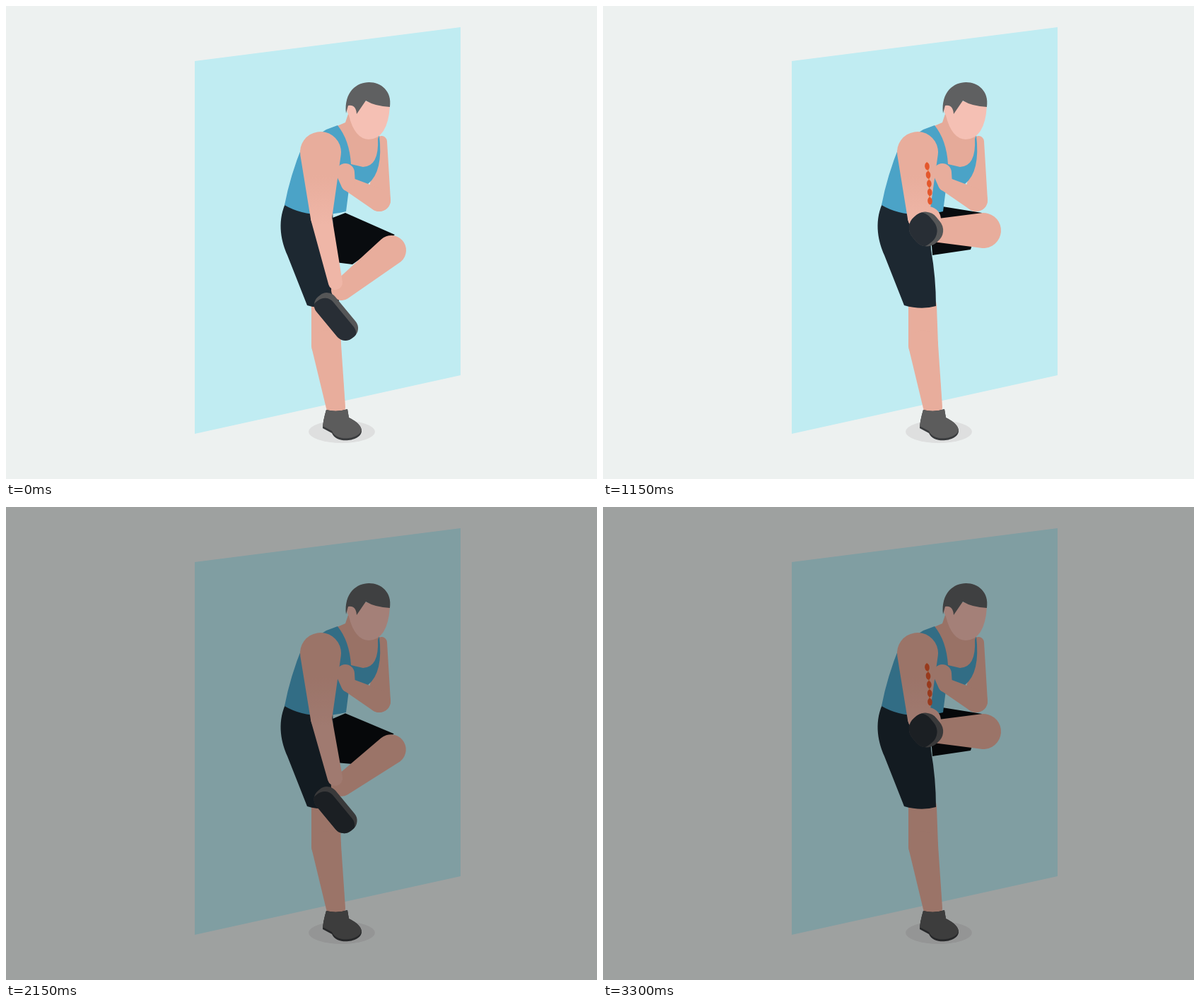
Animation of 836x670 px, one loop 3.35 s. Source, as an HTML page with a canvas:

```html
<!DOCTYPE html>
<html lang="en">
<head>
<meta charset="utf-8">
<title>Standing leg stretch</title>
<style>
html, body { margin: 0; width: 100%; height: 100%; overflow: hidden; background: #edf1f0; }
canvas { display: block; }
</style>
</head>
<body>
<canvas id="stage" width="836" height="670"></canvas>
<script>
const ctx = document.getElementById('stage').getContext('2d');
const LOOP = 3350;
const SKIN = '#e8ad9c';

const ramp = (t, a, b) => Math.max(0, Math.min(1, (t - a) / (b - a)));
const ease = x => x * x * (3 - 2 * x);

const wall = new Path2D('M267 78L643 30V523L267 606Z');
const shorts = new Path2D('M395 280C383 308 390 335 398 353L426 424Q450 431 471 425Q471 385 464 345L462 288Z');
const chest = new Path2D('M485 150L480 165L466 171Q478 190 486 230H514Q530 215 528 186L518 172Z');
const shirt = new Path2D('M420 196Q402 240 394 282Q430 303 481 291L486 252H512Q534 235 528 183L526 188Q528 227 505 228L488 224Q486 190 469 169L453 175Z');
const face = new Path2D('M496 132L543 142Q540 188 513 189Q493 188 485 155Q478 143 487 138Z');
const hair = new Path2D('M481 152C475 93 550 97 543 143Q522 142 509 134L496 153Q495 139 484 141Z');
const shoe = new Path2D('M453 572Q468 576 483 571L485 583Q503 592 503 602C503 616 468 622 461 605L448 598Q448 589 453 572Z');

function fill(path, color) {
  ctx.fillStyle = color;
  ctx.fill(path);
}

// Limb segment: two circles and the hull around them
function taper([x1, y1, r1], [x2, y2, r2], color) {
  const dir = Math.atan2(y2 - y1, x2 - x1);
  const open = Math.acos((r1 - r2) / Math.hypot(x2 - x1, y2 - y1));
  const path = new Path2D();
  path.arc(x1, y1, r1, dir + open, dir - open + 2 * Math.PI);
  path.arc(x2, y2, r2, dir - open, dir + open);
  path.closePath();
  fill(path, color);
}

// Fills a shape, then a shifted copy of it kept inside
function twoTone(path, base, top, dx, dy) {
  ctx.save();
  fill(path, base);
  ctx.clip(path);
  ctx.translate(dx, dy);
  fill(path, top);
  ctx.restore();
}

function polygon(points, color) {
  const path = new Path2D();
  points.forEach(p => path.lineTo(...p));
  fill(path, color);
}

function standingLeg() {
  const calf = [453, 480, 21];
  taper([452, 425, 20], calf, SKIN);
  taper(calf, [466.5, 568, 13.5], SKIN);
  twoTone(shoe, '#393b3d', '#5c5c5c', 0, -3);
}

function thigh(p) {
  polygon([
    [462, 300],
    [480, 293 - 9 * p],
    [550 - 14 * p, 324 - 31 * p],
    [490 + 30 * p, 366 - 21 * p],
    [466, 363 - 10 * p]
  ], '#090c0f');
}

function body() {
  const elbow = [528, 275, 16];
  const wrist = [484, 252, 10];
  taper([531, 192, 8], elbow, SKIN);
  fill(chest, '#e5aa99');
  fill(shirt, '#4ba3c7');
  taper(elbow, wrist, SKIN);
  taper(wrist, [480, 236, 13], SKIN);
  fill(face, '#f5c0b4');
  fill(hair, '#5f6061');
}

function shin(p) {
  taper([475, 402 - 84 * p, 15 + 2 * p], [545 - 7 * p, 346 - 28 * p, 21 + 4 * p], SKIN);
}

function nearArm(p) {
  const tone = ctx.createLinearGradient(0, 240, 0, 310);
  tone.addColorStop(0, SKIN);
  tone.addColorStop(1, '#efb6a7');
  const elbow = [446, 300, 15];
  taper(elbow, [466 - 6 * p, 392 - 90 * p, 10 + 8 * p], tone);
  taper([445, 207, 29], elbow, tone);
}

function raisedShoe(p) {
  const length = 38 - 14 * p;
  const width = 17 + 5 * p;
  const shape = new Path2D();
  shape.roundRect(-length, -width, 2 * length, 2 * width, width * 0.9);
  ctx.save();
  ctx.translate(467 - 10 * p, 440 - 124 * p);
  ctx.rotate(0.88);
  twoTone(shape, '#555657', '#282e35', 4 - 9 * p, 7);
  ctx.restore();
}

function strain(p) {
  ctx.save();
  ctx.globalAlpha = ramp(p, 0.2, 0.6);
  ctx.strokeStyle = '#ef8a55';
  ctx.lineWidth = 1 + p;
  ctx.beginPath();
  ctx.moveTo(458, 221);
  ctx.quadraticCurveTo(463, 250, 462, 280);
  ctx.stroke();
  for (let i = 0; i < 5; i++) {
    const dash = new Path2D();
    dash.ellipse(458.5 + 4 * Math.sin(i * 0.4), 227 + i * 12.3, 1 + 2.3 * p, 5.2, -0.1, 0, 7);
    fill(dash, '#e4572c');
  }
  ctx.restore();
}

function draw(t) {
  const p = ease(ramp(t, 150, 850)) - ease(ramp(t, 1170, 2370)) + ease(ramp(t, 2600, 3300));

  ctx.fillStyle = '#edf1f0';
  ctx.fillRect(0, 0, 836, 670);
  fill(wall, '#c0ecf2');
  const shadow = new Path2D();
  shadow.ellipse(475, 603, 47, 16, 0, 0, 7);
  fill(shadow, '#dedfdf');

  standingLeg();
  thigh(p);
  fill(shorts, '#1d2831');
  body();
  shin(p);
  nearArm(p);
  raisedShoe(p);
  strain(p);

  ctx.fillStyle = `rgba(0,0,0,${0.335 * ramp(t, 1900, 2100)})`;
  ctx.fillRect(0, 0, 836, 670);
}

const start = performance.now();
function tick() {
  draw((performance.now() - start) % LOOP);
  requestAnimationFrame(tick);
}
tick();
</script>
</body>
</html>
```
